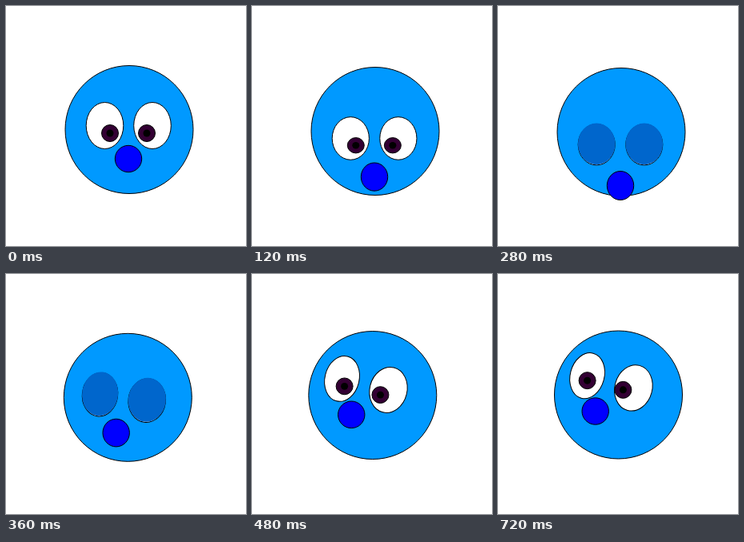
Write an HTML page that moves like this. It is 300 px wide and 300 px high and loops after 1.08 s.

```html
<!DOCTYPE html>
<html lang="en">
<head>
<meta charset="utf-8">
<title>Blue face</title>
<style>
  html, body { margin: 0; width: 100%; height: 100%; overflow: hidden; background: #fff; }
  svg { display: block; width: 100vw; height: 100vh; }
  ellipse { stroke: #000; stroke-width: 1; }
  .head { fill: #09f; }
  .white { fill: #fff; }
  .iris { fill: #303; }
  .core { fill: #000; stroke: none; }
  .lid { fill: #06c; stroke: none; }
  .nose { fill: #00f; }
</style>
</head>
<body>
<svg viewBox="0 0 300 300">
  <ellipse class="head" rx="80" ry="80"/>
  <g class="eye">
    <ellipse class="white"/>
    <g class="pupil"><ellipse class="iris" rx="10.5" ry="10.5"/><ellipse class="core" rx="4.5" ry="4.5"/></g>
    <ellipse class="lid"/>
  </g>
  <g class="eye">
    <ellipse class="white"/>
    <g class="pupil"><ellipse class="iris" rx="10.5" ry="10.5"/><ellipse class="core" rx="4.5" ry="4.5"/></g>
    <ellipse class="lid"/>
  </g>
  <ellipse class="nose"/>
</svg>
<script>
const LOOP = 1080, STEP = 40, SPAN = 280;
const GLANCE = 440;            // pupils drift once the lids open
const BLINK = [200, 440];
const TILT = 15;

// Each pose list: rest, crouch, tilted.
const HEAD = [[154, 154.5], [154, 157.5], [150.5, 151]];
const NOSE = [[153, 191, 16.7, 16.7], [153, 224.5, 16.7, 18], [121.7, 171.5, 16.7, 16.7]];
const EYES = [
  { poses: [[123.5, 149.5, 23.3, 29], [123.2, 173.2, 23, 25.7], [111.6, 127.2, 21.3, 29]], look: [6.5, 9.5] },
  { poses: [[183, 149.5, 23.3, 29], [182.8, 173.2, 23, 25.7], [169.4, 142.4, 23.4, 29]], look: [-7, 9.5] }
];
const DRIFT = [-3.8, -4.9];

const $ = s => document.querySelector(s);
const head = $('.head'), nose = $('.nose');
document.querySelectorAll('.eye').forEach((g, i) => {
  for (const name of ['white', 'pupil', 'lid']) EYES[i][name] = g.querySelector('.' + name);
});

const easeOut = (t, start) => {
  const k = Math.min(1, Math.max(0, (t - start) / SPAN));
  return 1 - (1 - k) ** 2;
};
const mix = (a, b, k) => a.map((v, i) => v + (b[i] - v) * k);
const set = (el, attrs) => {
  for (const key in attrs) el.setAttribute(key, attrs[key]);
};

function draw(t) {
  const down = easeOut(t, 0), up = easeOut(t, SPAN), glance = easeOut(t, GLANCE);
  const pose = p => mix(mix(p[0], p[1], down), p[2], up);
  const shut = t >= BLINK[0] && t < BLINK[1];
  const turn = TILT * up, a = turn * Math.PI / 180;

  const [hx, hy] = pose(HEAD);
  set(head, { cx: hx, cy: hy });
  const [nx, ny, nrx, nry] = pose(NOSE);
  set(nose, { cx: nx, cy: ny, rx: nrx, ry: nry });

  for (const eye of EYES) {
    const [x, y, rx, ry] = pose(eye.poses);
    const squash = ry / 29, lx = eye.look[0], ly = eye.look[1] * squash;
    const transform = `translate(${x} ${y}) rotate(${turn})`;
    set(eye.white, { rx, ry, transform });
    set(eye.lid, { rx: rx + .3, ry: ry + .2, cy: -.8, transform, visibility: shut ? 'visible' : 'hidden' });
    const px = x + lx * Math.cos(a) - ly * Math.sin(a) + DRIFT[0] * glance;
    const py = y + lx * Math.sin(a) + ly * Math.cos(a) + DRIFT[1] * glance;
    set(eye.pupil, { transform: `translate(${px} ${py}) scale(1 ${squash})`, visibility: shut ? 'hidden' : 'visible' });
  }
}

const begin = performance.now();
function tick(now) {
  const t = Math.max(0, now - begin) % LOOP;
  draw(Math.floor(t / STEP) * STEP);
  requestAnimationFrame(tick);
}
draw(0);
requestAnimationFrame(tick);
</script>
</body>
</html>
```
